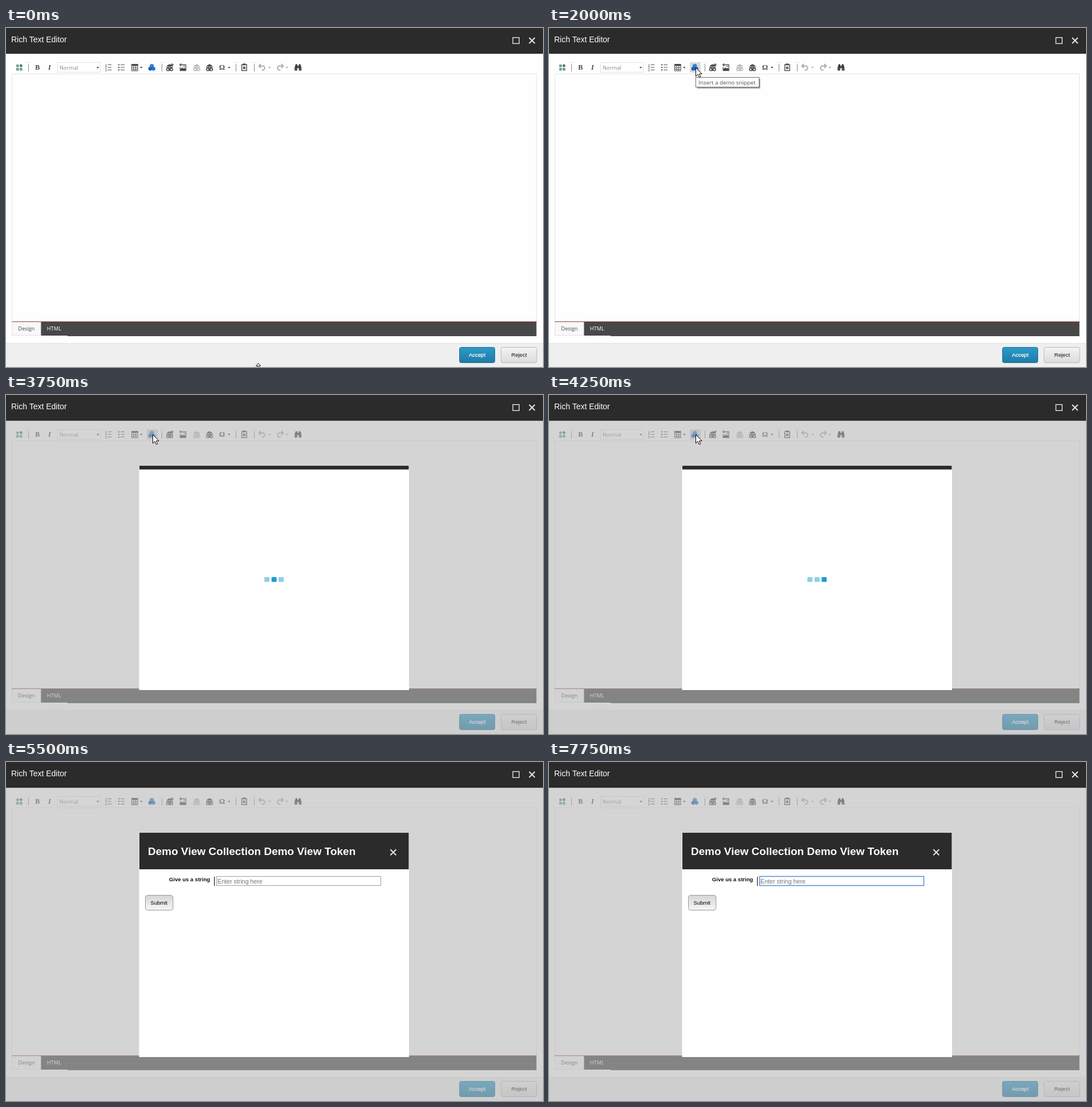
Animation, 942 px wide and 594 px high, one loop 8000 ms. Source, as an HTML page:

```html
<!DOCTYPE html>
<html lang="en">
<head>
<meta charset="utf-8">
<title>Rich Text Editor</title>
<style>
  html, body { margin: 0; width: 100%; height: 100%; overflow: hidden; background: #fefefe; }
  svg { display: block; width: 942px; height: 594px; }
  text { font-family: "Liberation Sans", Arial, sans-serif; white-space: pre; }
  .ui { font-family: "Open Sans", "Noto Sans", sans-serif; }
  .serif { font-family: "Liberation Serif", "Noto Serif", serif; font-weight: bold; }
</style>
</head>
<body>
<svg id="stage" viewBox="0 0 942 594" xmlns="http://www.w3.org/2000/svg">
  <defs>
    <linearGradient id="blue" x2="0" y2="1"><stop stop-color="#2c9aca"/><stop offset="1" stop-color="#1f7ba5"/></linearGradient>
    <linearGradient id="light" x2="0" y2="1"><stop stop-color="#f3f3f3"/><stop offset="1" stop-color="#dcdcdc"/></linearGradient>
    <linearGradient id="grey" x2="0" y2="1"><stop stop-color="#d6d6d6"/><stop offset="1" stop-color="#f6f6f6"/></linearGradient>
    <g id="globe" fill="none" stroke="currentColor">
      <path d="M-5 0A5 5.2 0 0 1 5 0M-4 -3H4M-5 0H5M0 -6V0M-2.2 0Q-2.4 -4 0 -5.5Q2.4 -4 2.2 0" stroke-width="1.2"/>
      <rect x="-5.5" y="1.2" width="5.4" height="4" rx="2" stroke-width="1.5"/>
      <rect x="0.1" y="1.2" width="5.4" height="4" rx="2" stroke-width="1.5"/>
      <path d="M-2.5 3.2H2.5" stroke-width="1.4"/>
    </g>
    <path id="caret" d="M-2.3 -1.2H2.3L0 1.5Z" fill="currentColor"/>
    <path id="turn" d="M-3.8 -2.5H1.2A3.6 3.6 0 0 1 1.2 4.7H-0.5M-2 -6L-5.4 -2.5L-2 1" fill="none" stroke="#aaa" stroke-width="1.9"/>
    <g id="sep"><path d="M0.5 63V76" stroke="#8a8a8a"/><path d="M-4 60.5H5" stroke="#e6e6e6"/></g>
    <path id="cross" d="M-5 -5L5 5M5 -5L-5 5" stroke="#e4e4e4" stroke-width="2" fill="none"/>
    <path id="arrow" d="M.5 .5V15.6L4 12.3L6.5 17.6L8.9 16.5L6.5 11.4H11.2Z" fill="#fff" stroke="#000"/>
    <path id="move" d="M0 -11L4 -6.5H1V-1H6.5V-4L11 0L6.5 4V1H1V6.5H4L0 11L-4 6.5H-1V1H-6.5V4L-11 0L-6.5 -4V-1H-1V-6.5H-4Z" fill="#fff" stroke="#000"/>
  </defs>

  <rect width="942" height="594" fill="#fefefe"/>
  <rect y="552" width="942" height="42" fill="#efefef"/>
  <path d="M0 552.5H942" stroke="#e4e4e4"/>

  <g color="#484848">
    <g fill="#6fa08c">
      <rect x="18" y="64" width="4.6" height="4.6"/><rect x="18" y="70" width="4.6" height="4.6"/>
      <rect x="24" y="70" width="4.6" height="4.6"/><path d="M26.3 62.8L29.3 66L26.3 69.2L23.3 66Z" fill="#4d7b69"/>
    </g>
    <text class="serif" x="51.3" y="73" font-size="12" fill="#444">B</text>
    <text class="serif" x="74" y="73" font-size="12" font-style="italic" fill="#444">I</text>
    <rect x="90.5" y="60.5" width="75" height="17" fill="#fff" stroke="#e2e2e2"/>
    <text class="ui" x="94" y="72.6" font-size="9.4" fill="#858585">Normal</text>
    <use href="#caret" x="161" y="69.5"/>
    <g id="lists"></g>

    <g fill="none" stroke="#484848">
      <rect x="220.5" y="63.5" width="10.5" height="11.5"/>
      <path d="M220 65H231.5" stroke-width="3"/>
      <path d="M220 69.5H231M220 72.5H231M224 66V75M227.5 66V75" stroke-width=".9"/>
    </g>
    <use href="#caret" x="237.3" y="69.3"/>
    <rect id="hover" x="247" y="60" width="19" height="18" fill="#dadada"/>
    <g stroke="#0c4a94" stroke-width=".4">
      <path d="M255.8 63L259 64.5V68.3L255.8 69.8L252.6 68.3V64.5Z" fill="#2f86dd"/>
      <path d="M253 68L256 69.4V73.2L253 74.7L250 73.2V69.4Z" fill="#1566bd"/>
      <path d="M258.6 68L261.6 69.4V73.2L258.6 74.7L255.6 73.2V69.4Z" fill="#1c78d6"/>
    </g>

    <use href="#globe" x="287" y="69.5"/>
    <path d="M291.5 62V67M289 64.5H294" stroke="#484848" stroke-width="1.5"/>
    <path d="M309 64.5H315.5V74.5H305.5V68.5" fill="none" stroke="#484848" stroke-width="1.3"/>
    <path d="M306 74V72L309 69L311 71L313 69.5L315 72V74Z" fill="#484848"/>
    <path d="M306.5 62V67M304 64.5H309" stroke="#484848" stroke-width="1.5"/>
    <circle cx="312.5" cy="67.3" r="1.1" fill="#484848"/>
    <g color="#b9b9b9"><use href="#globe" x="334.5" y="69.5"/></g>
    <use href="#globe" x="357" y="69.5"/>
    <text x="373.8" y="73.3" font-size="13" font-weight="bold" class="serif" fill="#484848">Ω</text>
    <use href="#caret" x="391.3" y="69.3"/>
    <rect x="413.6" y="64.2" width="8.6" height="10.4" fill="#fff" stroke="#484848" stroke-width="1.4"/>
    <rect x="415.5" y="62.3" width="4.8" height="3" fill="#484848"/>
    <rect x="415.7" y="67.6" width="4.4" height="4.4" fill="#666"/>
    <use href="#turn" x="449" y="69"/>
    <use href="#turn" transform="translate(481 69) scale(-1 1)"/>
    <g color="#aaa"><use href="#caret" x="462.3" y="69.3"/><use href="#caret" x="492.8" y="69.3"/></g>
    <path d="M508 63.5H511V66H513.5V63.5H516.5L518.3 70V74.5H513.7V70.5H510.8V74.5H506.2V70Z" fill="#3c3c3c"/>
    <path d="M512.2 66V70M507 71.3H510M514.5 71.3H517.5" stroke="#aaa" stroke-width=".7"/>
    <use href="#sep" x="39"/><use href="#sep" x="273"/><use href="#sep" x="403"/><use href="#sep" x="435"/>
  </g>

  <path d="M10.5 514V80.5H930.5V514" fill="none" stroke="#e5e5e5"/>
  <rect x="61" y="515" width="869.5" height="24" fill="#474747"/>
  <rect x="108" y="539" width="822.5" height="1" fill="#474747"/>
  <rect x="10.5" y="515.5" width="50.5" height="23" fill="#f8f8f8" stroke="#e2e2e2"/>
  <path d="M10 514.5H931" stroke="#a85454"/>
  <text class="ui" x="21.3" y="530" font-size="9.1" fill="#444">Design</text>
  <text class="ui" x="71.8" y="530" font-size="9.2" fill="#fff">HTML</text>

  <rect x="795.5" y="559.5" width="62" height="27" rx="3" fill="url(#blue)" stroke="#1d7299"/>
  <text x="812" y="575.6" font-size="9.5" fill="#fff" stroke="#fff" stroke-width=".25">Accept</text>
  <rect x="868.5" y="559.5" width="62.5" height="27" rx="3" fill="url(#light)" stroke="#b8b8b8"/>
  <text x="886.6" y="575.6" font-size="9.5" fill="#111">Reject</text>

  <rect id="veil" y="45" width="942" height="549" fill="#b5b5b5" fill-opacity=".56"/>

  <rect width="942" height="45" fill="#2b2b2b"/>
  <path d="M0 45.5H942" stroke="#000" stroke-opacity=".12"/>
  <text x="9" y="25" font-size="14" fill="#fff">Rich Text Editor</text>
  <rect x="889.2" y="16.7" width="11" height="10.6" fill="none" stroke="#e4e4e4" stroke-width="1.4"/>
  <use href="#cross" x="922.7" y="22"/>

  <g id="dialog">
    <rect x="233.5" y="124" width="473.5" height="393" fill="#fff"/>
    <rect id="bar" x="234" y="124" width="472.5" fill="#2b2b2b"/>
    <g id="dots"></g>
    <g id="form">
      <text x="249" y="163.3" font-size="19" font-weight="bold" fill="#fff">Demo View Collection Demo View Token</text>
      <use href="#cross" x="679.3" y="158.3"/>
      <text x="286" y="209" font-size="9.6" font-weight="bold" fill="#111">Give us a string</text>
      <path d="M365.5 201V217" stroke="#000"/>
      <rect id="field" x="369.5" y="200.5" width="288" height="16" fill="#fff"/>
      <text x="371" y="212.7" font-size="10.7" fill="#757575">Enter string here</text>
      <path id="beam" d="M371.5 203V215" stroke="#000"/>
      <rect x="244.5" y="233.5" width="48.5" height="26" rx="4" fill="url(#grey)" stroke="#979797"/>
      <text x="253.6" y="249.5" font-size="9.5" fill="#000">Submit</text>
    </g>
  </g>

  <g id="tip">
    <rect x="260" y="89" width="111" height="17.5" fill="#000" opacity=".2"/>
    <rect x="259.5" y="88.5" width="110.5" height="17" fill="#000" opacity=".25"/>
    <rect x="257.5" y="86.5" width="111" height="17" fill="#fff" stroke="#707070"/>
    <text class="ui" x="262.3" y="98.8" font-size="9.8" fill="#505050">Insert a demo snippet</text>
  </g>
  <use id="cursor"/>
</svg>

<script>
const LOOP = 8000;
const $ = id => document.getElementById(id);
const show = (id, on) => $(id).setAttribute("visibility", on ? "inherit" : "hidden");
const set = (el, attrs) => { for (const k in attrs) el.setAttribute(k, attrs[k]); };

function add(parent, tag, attrs, text = "") {
  const el = document.createElementNS("http://www.w3.org/2000/svg", tag);
  set(el, attrs);
  el.textContent = text;
  return $(parent).appendChild(el);
}

// numbered and bulleted list icons
for (let i = 0; i < 3; i++) {
  const y = 64.5 + i * 4.5;
  add("lists", "path", { d: `M178.5 ${y}H185M201 ${y}H208`, stroke: "#555", "stroke-width": 1.2 });
  add("lists", "text", { x: 173.8, y: y + 2, "font-size": 5.5, fill: "#333" }, i + 1);
  add("lists", "rect", { x: 197, y: y - 1, width: 2, height: 2, fill: "#444" });
}

const dots = [0, 1, 2].map(i =>
  add("dots", "rect", { x: 453.2 + i * 12.5, y: 319, width: 9, height: 8.5, rx: 1.5 }));

// start time, shape, x, y
const pointer = [
  [0, "move", 442.5, 598.5],
  [250],
  [1500, "arrow", 261, 71],
  [1750, "arrow", 257, 69],
  [4500, "arrow", 257, 71],
  [4750, "move", 293.5, 153.5],
  [5000, "arrow", 380, 303],
  [5250, "arrow", 436, 211],
  [5500]
];

function draw(t) {
  const within = (a, b = LOOP) => t >= a && t < b;
  const ready = t >= 4500, focus = t >= 7250;

  show("hover", within(1500, 4750));
  show("tip", within(2000, 3500));
  show("veil", within(3750));
  show("dialog", within(3750));
  show("form", ready);
  show("dots", within(3750, 4500));
  show("beam", within(7250, 7750));
  set($("bar"), { height: ready ? 64 : 6.5 });
  set($("field"), { stroke: focus ? "#5d94d8" : "#a0a0a0", "stroke-width": focus ? 1.6 : 1 });

  const lit = t < 4000 ? 1 : t < 4250 ? 0 : 2;
  dots.forEach((dot, i) => set(dot, { fill: i === lit ? "#249cd2" : "#92cde8" }));

  const [, shape, x, y] = pointer.filter(p => p[0] <= t).pop();
  show("cursor", shape);
  if (shape) set($("cursor"), { href: "#" + shape, x, y });
}

const start = performance.now();
function tick() {
  draw((performance.now() - start) % LOOP);
  requestAnimationFrame(tick);
}
tick();
</script>
</body>
</html>
```
